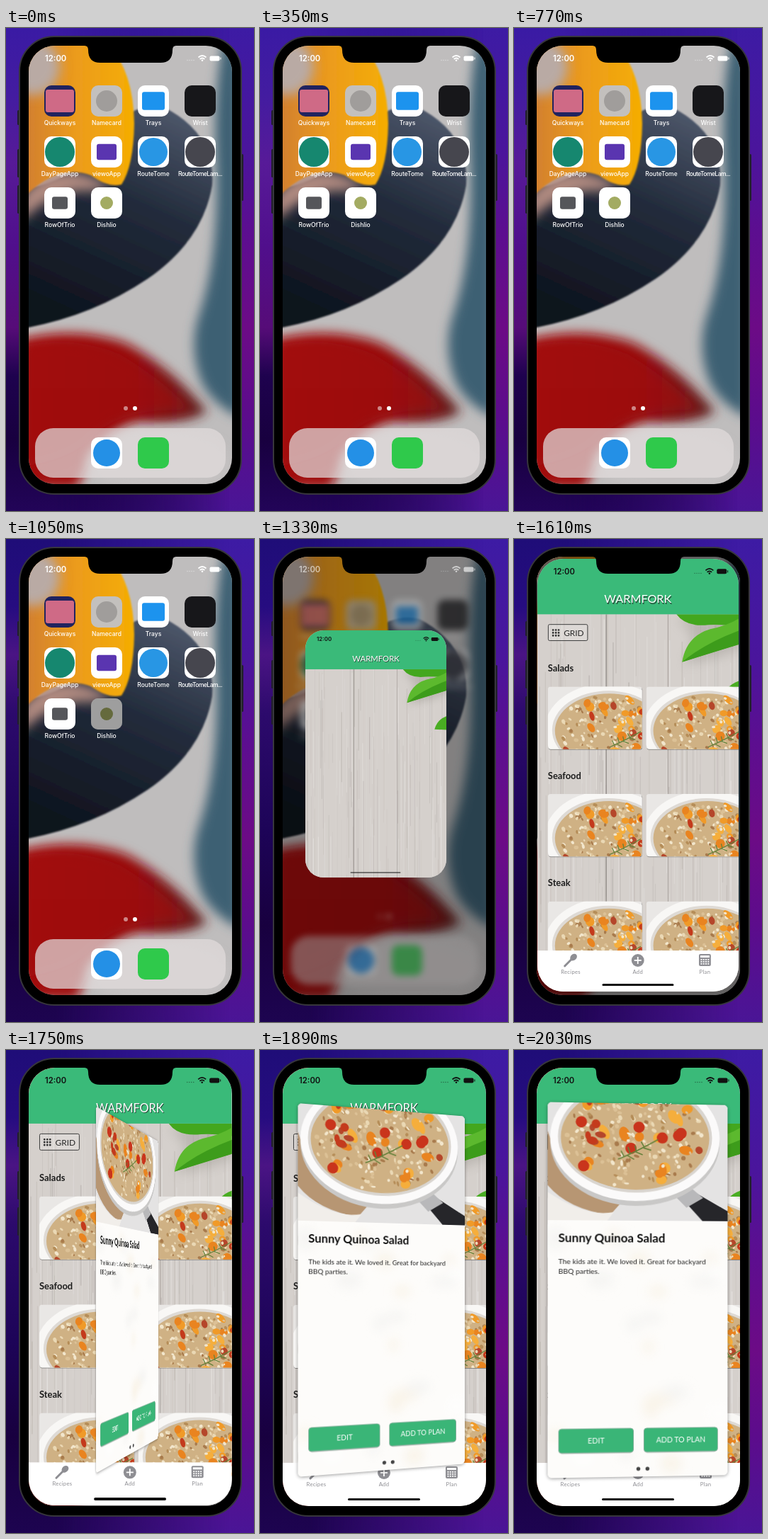
An HTML page that plays this animation: 350 px wide and 682 px high, repeating every 2.1 s.

```html
<!DOCTYPE html>
<html lang="en">
<head>
<meta charset="utf-8">
<style>
html, body { margin: 0; width: 100%; height: 100%; overflow: hidden; background: #1b0750; }
div, svg { position: absolute; display: block; }
#stage { width: 350px; height: 682px; overflow: hidden;
  background: linear-gradient(#3d1ba4, #4a159c 25%, #5c0e90 42%, #6c0b86 62%, #5c0c8c 80%, #4a1596); }
.left { inset: 0; -webkit-mask: linear-gradient(90deg, #000 20%, transparent 90%); mask: linear-gradient(90deg, #000 20%, transparent 90%); }
#dark { background: linear-gradient(#1f0d78, #260c80 14%, #4a1484 24%, #2c0a6c 36%, #1d0458 60%, #18003f 80%, #1d0450); }
#bright { background: linear-gradient(#3a1aa4, #431ca0 14%, #571a98 28%, #500f8c 45%, #560c78 62%, #1e024e 72%, #18003f 85%, #220458); }
.btn { background: #211f2c; border-radius: 2px; width: 3px; }
#body { left: 18px; top: 11px; width: 311px; height: 644px; border: 2px solid #37363c; border-radius: 50px; background: #000; }
#screen { left: 32px; top: 25px; width: 287px; height: 619px; border-radius: 37px; overflow: hidden; }
#screen svg.full { left: 0; top: 0; }
#dim { inset: 0; background: #000; }
#icons { transform-origin: 143px 309px; }
#app { overflow: hidden; background: #d6d2ce; }
#page { width: 287px; height: 619px; transform-origin: 0 0; }
#card { left: 14.5px; top: 48px; width: 257px; height: 532px; border-radius: 6px; overflow: hidden;
  backface-visibility: hidden; background: #fff; box-shadow: 0 1px 5px #0006; }
#bar { left: 50%; background: #111; transform: translateX(-50%); }
text { font-family: Lato, sans-serif; }
.ui { font-family: Inter, sans-serif; }
</style>
</head>
<body>
<div id="stage">
  <div id="dark" class="left"></div>
  <div id="bright" class="left"></div>
  <div class="btn" style="left:16px;top:116px;height:21px"></div>
  <div class="btn" style="left:16px;top:171px;height:40px"></div>
  <div class="btn" style="left:16px;top:222px;height:40px"></div>
  <div class="btn" style="left:332px;top:178px;height:66px"></div>
  <div id="body"></div>
  <div id="screen">
    <div id="home"></div>
    <div id="app"><div id="page"></div><div id="bar"></div></div>
    <svg class="full" width="287" height="619" viewBox="32 25 287 619">
      <path d="M111 24H240V25Q235 25 235 31Q235 49 218 49H133Q116 49 116 31Q116 25 111 25Z"/>
    </svg>
  </div>
</div>
<script>
const $ = id => document.getElementById(id);
const clamp = v => Math.max(0, Math.min(1, v));
let seed = 7;
const rnd = (a = 1, b = 0) => {
  seed = (seed * 16807) % 2147483647;
  return b + (a - b) * seed / 2147483647;
};
const many = (n, f) => Array.from({ length: n }, (_, i) => f(i)).join('');

const svg = (inner, id = '', box = '32 25 287 619', w = 287, h = 619) =>
  `<svg class="full" id="${id}" width="${w}" height="${h}" viewBox="${box}">${inner}</svg>`;
const text = (x, y, size, str, attr = '') =>
  `<text x="${x}" y="${y + size * .35}" font-size="${size}" ${attr}>${str}</text>`;
const rect = (x, y, w, h, fill, r = 0, attr = '') =>
  `<rect x="${x}" y="${y}" width="${w}" height="${h}" rx="${r}" fill="${fill}" ${attr}/>`;
const circle = (x, y, r, fill, attr = '') => `<circle cx="${x}" cy="${y}" r="${r}" fill="${fill}" ${attr}/>`;
const MID = 'text-anchor="middle" ';

const status = c => text(55, 43, 11.3, '12:00', `class="ui" font-weight="600" fill="${c}"`) +
  many(4, i => circle(256 + i * 3, 45.5, .7, c, 'opacity=".5"')) +
  `<g fill="none" stroke="${c}" stroke-width="1.7"><path d="M271.5 41.5Q277 36.500 282.500 41.500M273.700 44Q277 41 280.300 44"/></g>` +
  circle(277, 45.8, 1.3, c) + rect(287.500, 39.500, 14, 7, c, 2) + rect(302.500, 41.500, 1, 3, c);

/* Home screen */
const wallpaper = `<defs>
  <filter id="b1" x="-30%" y="-30%" width="160%" height="160%"><feGaussianBlur stdDeviation="1"/></filter>
  <filter id="b8" x="-50%" y="-50%" width="200%" height="200%"><feGaussianBlur stdDeviation="8"/></filter>
  <linearGradient id="navy" x1=".7" y1="0" x2=".3" y2="1"><stop stop-color="#4b5568"/><stop offset=".4" stop-color="#232c3c"/><stop offset="1" stop-color="#0d121c"/></linearGradient>
  <linearGradient id="gold"><stop stop-color="#cf7c32"/><stop offset=".5" stop-color="#ec9c1c"/><stop offset="1" stop-color="#f5ad02"/></linearGradient>
  <linearGradient id="red"><stop stop-color="#a40811"/><stop offset=".6" stop-color="#960a10"/><stop offset="1" stop-color="#5c2422"/></linearGradient>
  </defs>` + rect(32, 25, 287, 619, '#bfbdbd') +
  `<path d="M330 20H306Q292 100 297 200Q300 320 274 400Q256 450 276 500Q290 530 330 550Z" fill="#3d6173" filter="url(#b8)"/>
  <path d="M20 225Q90 230 160 130Q190 105 225 113Q296 150 291 222Q278 300 200 354Q120 408 20 425Z" fill="url(#navy)" filter="url(#b1)"/>
  <path d="M20 240Q70 175 150 225L120 230Q70 225 20 275Z" fill="#b08a80" filter="url(#b8)"/>
  <path d="M20 20H142Q180 60 181 135Q180 195 163 221Q145 226 120 208Q70 190 20 245Z" fill="url(#gold)" filter="url(#b1)"/>
  <ellipse cx="38" cy="55" rx="38" ry="40" fill="#b9aaa4" filter="url(#b8)"/>
  <path d="M20 440Q100 420 170 445Q235 480 284 542Q250 562 185 556Q130 570 100 650H20Z" fill="url(#red)" filter="url(#b8)"/>
  <path d="M20 450Q90 432 160 460Q220 495 262 540Q160 535 120 580Q90 610 20 620Z" fill="#a1070f" opacity=".6" filter="url(#b8)"/>
  <ellipse cx="215" cy="612" rx="100" ry="45" fill="#c8c4c4" opacity=".8" filter="url(#b8)"/>`;

// label, tile colour, mark shape, mark colour, mark size
const apps = [
  ['Quickways', '#20235f', 's', '#cf6a86', 20], ['Namecard', '#c3c0bd', 'c', '#a09d9b', 15],
  ['Trays', '#fff', 's', '#1c93ee', 16], ['Wrist', '#17171a'],
  ['DayPageApp', '#fff', 'c', '#16876f', 21], ['viewoApp', '#fff', 's', '#5a35b0', 14],
  ['RouteTome', '#fff', 'c', '#2896e4', 20], ['RouteTomeLam...', '#fff', 'c', '#46464e', 21],
  ['RowOfTrio', '#fff', 's', '#55565a', 11], ['Dishlio', '#fff', 'c', '#a3ab62', 9]];
const icon = (x, y, [name, tile, kind, color, r]) => rect(x, y, 44, 44, tile, 10) +
  (kind === 'c' ? circle(x + 22, y + 22, r, color) : kind ? rect(x + 22 - r, y + 22 - r * .8, r * 2, r * 1.6, color, 3) : '') +
  (name ? text(x + 22, y + 53, 8.5, name, MID + `class="ui" font-weight="500" fill="#fff" ${name.length > 12 ? 'letter-spacing="-.55"' : ''}`) : '');

$('home').innerHTML = svg(wallpaper) +
  svg(apps.map((a, i) => `<g id="icon${i}">${icon(54 + i % 4 * 66, 81 + (i >> 2) * 72, a)}</g>`).join('') +
    rect(120, 225, 44, 44, '#000', 10, 'id="press" opacity=".38"') +
    circle(169, 537, 3, '#fff', 'opacity=".5"') + circle(182, 537, 3, '#fff') +
    rect(41, 565, 269, 70, '#e2dddd', 26, 'opacity=".72"') +
    icon(120, 578, ['', '#fff', 'c', '#2490e6', 19]) + icon(186, 578, ['', '#2fc94b']), 'icons') +
  '<div id="dim" style="width:287px;height:619px"></div>' + svg(status('#fff'), 'clock');

/* Dish pictures */
const pick = list => list[Math.floor(rnd(list.length))];
const food = (cx, cy, rx, ry, s) => {
  const blob = (colors, a, b) => {
    const q = rnd(6.283), d = Math.sqrt(rnd()) * .94;
    const x = cx + rx * d * Math.cos(q), y = cy + ry * d * Math.sin(q);
    return `<ellipse cx="${x.toFixed(1)}" cy="${y.toFixed(1)}" rx="${(rnd(a, b) * s).toFixed(1)}" ry="${(rnd(a, b) * s * .75).toFixed(1)}" fill="${pick(colors)}" transform="rotate(${rnd(90) | 0} ${x | 0} ${y | 0})"/>`;
  };
  return `<ellipse cx="${cx}" cy="${cy}" rx="${rx}" ry="${ry}" fill="#cfb184"/>` +
    many(150, () => blob(['#ead8b4', '#dcc196', '#b58d58', '#f2e6cc', '#a87a4c'], 3.500, 1.500)) +
    many(20, () => blob(['#f09a28', '#e98420', '#f5ae3c'], 9, 5)) +
    many(9, () => blob(['#c43a1c', '#b5462a'], 7, 4)) +
    many(60, () => blob(['#ead8b4', '#dcc196', '#f2e6cc'], 3, 1.300));
};
const sprig = (x, y, s) => `<path transform="translate(${x} ${y}) scale(${s})" fill="none" stroke="#64803a" stroke-width="1.500"
  d="M0 26Q20 18 52 0M8 23l-4-8M16 19l-3-9M24 16l-2-8M34 10l-4-7M12 21l9 5M22 16l10 4M33 11l10 3"/>`;
const dish = `<clipPath id="cc">${rect(0, 0, 134, 89, '', 4)}</clipPath><g id="dish" clip-path="url(#cc)">` +
  rect(0, 0, 134, 89, '#e9e7e5') + '<ellipse cx="86" cy="62" rx="91" ry="67" fill="#f8f7f5"/><ellipse cx="86" cy="62" rx="80" ry="56" fill="#dedad5"/>' +
  food(87, 63, 77, 53, 1) + sprig(88, 64, .85) + '</g>';
const pan = rect(46, 72, 259, 169, '#e4e3e3') +
  `<path d="M46 112Q70 190 150 215L135 232Q75 225 46 190Z" fill="#b79673"/><path d="M46 200Q100 236 140 228L130 241H46Z" fill="#f1eeea"/>
  <path d="M235 205L258 200L304 226V241H268Z" fill="#26262a"/><path d="M226 203L250 192L268 207L244 221Z" fill="#b8b8ba"/>
  <ellipse cx="171" cy="128" rx="121" ry="91" fill="#c9c8c7"/><ellipse cx="171" cy="122" rx="121" ry="90" fill="#fbfafa"/>
  <ellipse cx="171" cy="121" rx="110" ry="79" fill="#d9d5d0"/>` + food(171, 122, 106, 74, 1.250) +
  many(7, i => circle(90 + rnd(150), 95 + rnd(85), 8, '#c9341c')) + sprig(146, 124, 1.100);

/* App page */
const wood = rect(32, 104, 287, 540, '#d5d0cc') +
  many(150, () => rect(rnd(319, 32).toFixed(1), rnd(500, 60) | 0, rnd(1.800, .4).toFixed(1), rnd(330, 60) | 0, pick(['#8d8782', '#fff', '#aaa19a']), 0, `opacity="${rnd(.3, .1).toFixed(2)}"`)) +
  rect(129.500, 104, 1, 540, '#7d7773') + rect(217.500, 104, 1, 540, '#a49d98');
const leaf = (d, c) => `<path d="${d}" fill="${c}"/>`;
const leaves = `<path d="M228 112Q270 130 240 175Q290 168 325 150V100Z" fill="#807b74" opacity=".3" filter="url(#b8)"/>` +
  leaf('M230 104Q244 123 276 119Q300 118 322 122V104Z', '#43a71e') +
  leaf('M238 172Q244 135 278 125Q304 120 322 108V146Q280 158 238 172Z', '#5cb92e') +
  leaf('M238 172Q270 145 322 126V146Q280 159 238 172Z', '#3d9c1b') +
  leaf('M294 226Q300 203 325 197V227Z', '#49ad22');
const GREY = '#8e8e93';
const row = (name, y) => text(47, y - 26, 13, name, 'font-weight="700" fill="#1c1c1c"') +
  [47, 187].map(x => rect(x + .5, y + 1, 134, 89, '#555', 4, 'opacity=".6"') + `<use href="#dish" x="${x}" y="${y}"/>`).join('');
const tabs = rect(32, 583, 287, 61, '#fff') +
  `<path d="M71 605L81 595" stroke="${GREY}" stroke-width="3" stroke-linecap="round"/><ellipse cx="83.500" cy="592.500" rx="5.500" ry="4.200" transform="rotate(-45 83.500 592.500)" fill="${GREY}"/>` +
  circle(175, 597, 9, GREY) + `<path d="M170 597h10M175 592v10" stroke="#fff" stroke-width="1.800"/>` +
  rect(262, 588, 17, 17, GREY, 2) + rect(264, 590, 13, 3, '#fff') +
  many(12, i => rect(264.500 + i % 4 * 3.300, 595 + (i >> 2) * 3, 2, 1.800, '#fff')) +
  ['Recipes', 'Add', 'Plan'].map((s, i) => text(79.500 + i * 95.500, 613, 7.700, s, MID + `fill="${GREY}" letter-spacing=".3"`)).join('');
const list = rect(47.500, 118.500, 56, 23, '#ffffff30', 2, 'stroke="#3c3c3c"') +
  many(9, i => rect(53 + i % 3 * 4, 125 + (i / 3 | 0) * 4, 2.600, 2.600, '#333', .8)) + text(69.500, 130.500, 12, 'GRID', 'fill="#2a2a2a"') +
  row('Salads', 207) + row('Seafood', 360) + row('Steak', 513) + tabs;
const button = (x, y, s) => rect(x, y + 1.500, 106, 34, '#0003', 5) + rect(x, y, 106, 34, '#3ab577', 4, 'stroke="#7fae97"') +
  text(x + 53, y + 17, 10.800, s, MID + 'fill="#fff"');
const card = rect(46, 72, 259, 534, '#fdfcfa') +
  `<g filter="url(#b8)" opacity=".5">${many(22, () => `<ellipse cx="${rnd(305, 46) | 0}" cy="${rnd(590, 260) | 0}" rx="${rnd(28, 8) | 0}" ry="${rnd(18, 6) | 0}" fill="${pick(['#f6ecd9', '#eeeeec', '#fff'])}"/>`)}</g>` +
  `<clipPath id="pc">${rect(46, 72, 259, 168, '')}</clipPath><g clip-path="url(#pc)">${pan}</g>` +
  text(61.500, 265, 17.200, 'Sunny Quinoa Salad', 'font-weight="700" fill="#111"') +
  text(61.500, 298.500, 10.400, 'The kids ate it. We loved it. Great for backyard', 'fill="#222"') +
  text(61.500, 312.500, 10.400, 'BBQ parties.', 'fill="#222"') +
  button(62, 536, 'EDIT') + button(183, 536, 'ADD TO PLAN') + circle(175, 594, 2.800, '#444') + circle(188, 594, 2.800, '#444');

$('page').innerHTML = svg(`<defs>${dish}</defs>` + wood + leaves + rect(32, 25, 287, 79, '#3aba79') +
  text(176, 83.500, 16.300, 'WARMFORK', MID + 'fill="#222" opacity=".7"') + text(175, 82, 16.300, 'WARMFORK', MID + 'fill="#fff"') +
  status('#111') + `<g id="list">${list}</g>`) +
  `<div id="card">${svg(card, '', '46.5 73 257 532', 257, 532)}</div>`;

/* Motion */
const spring = (ms, rate) => ms <= 0 ? 0 : 1 - (1 + ms * rate) * Math.exp(-ms * rate);
const STEP = 70, LOOP = 2100, PRESS = 1050, OPEN = 1192, FLIP = 1589;

function draw(t) {
  const grow = (start, from, to) => from + (to - from) * spring(t - start, .0158);
  const p = spring(t - OPEN, .0158), open = t > OPEN;
  $('bright').style.opacity = t < PRESS ? 1 : 0;
  $('press').style.display = t >= PRESS && !open ? '' : 'none';
  $('icon9').style.display = open ? 'none' : '';
  $('dim').style.opacity = .5 * p;
  $('clock').style.opacity = 1 - .6 * p;
  $('icons').style.filter = p ? `blur(${5 * clamp(p * 1.500)}px)` : '';
  $('icons').style.opacity = 1 - .4 * p;
  $('icons').style.transform = `scale(${1 - .03 * p})`;

  const x = grow(OPEN, 88, 0), w = grow(OPEN, 132, 287) - x;
  const y = grow(1228, 200, 0), h = grow(1212, 244, 619) - y;
  const k = w / 287;
  Object.assign($('app').style, {
    display: open ? '' : 'none', left: x + 'px', top: y + 'px', width: w + 'px', height: h + 'px',
    borderRadius: 37 * k + 'px', opacity: clamp(p * 3)
  });
  $('page').style.transform = `scale(${k})`;
  const shown = clamp((t - 1330) / 155);
  $('list').style.opacity = shown;
  Object.assign($('bar').style, {
    width: 102 * k + 'px', height: 3.500 * k + 'px', bottom: 7.500 * k + 'px', borderRadius: '2px', opacity: .5 + .5 * shown
  });

  const turn = Math.PI * (1 - spring(t - FLIP, .0132));
  $('card').style.display = turn < Math.PI / 2 ? '' : 'none';
  $('card').style.transform = `perspective(983px) translateZ(${-156 * Math.sin(turn)}px) rotateY(${turn}rad)`;
}

function tick() {
  draw(Math.floor(performance.now() % LOOP / STEP) * STEP);
  requestAnimationFrame(tick);
}
tick();
</script>
</body>
</html>
```
